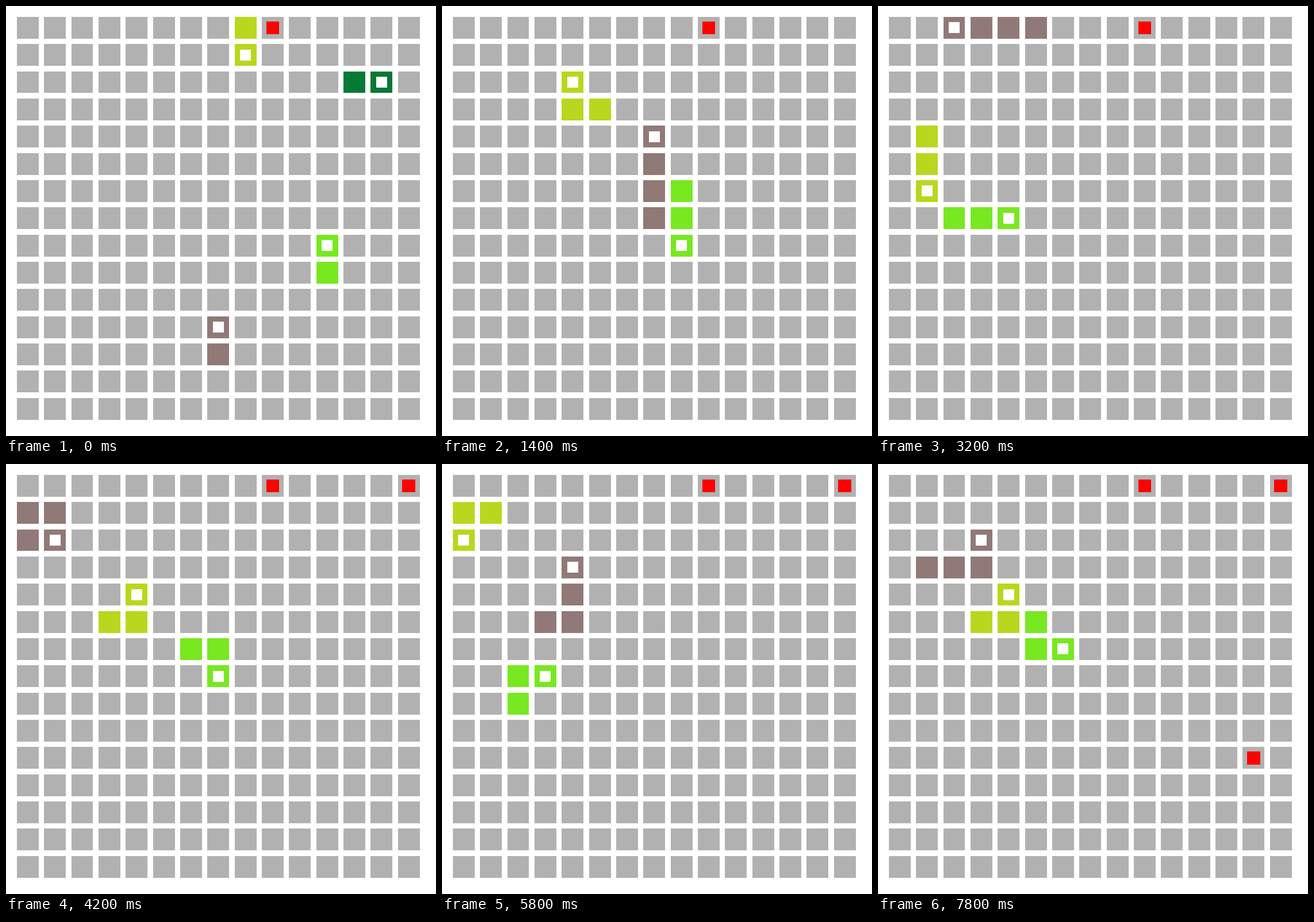
These frames come from a looping animation (748x748 px, 8000 ms). An HTML page with a canvas:

```html
<!DOCTYPE html>
<html lang="en">
<head>
<meta charset="utf-8">
<title>Snakes</title>
<style>
  html, body { margin: 0; width: 100%; height: 100%; overflow: hidden; background: #fff; }
  canvas { display: block; }
</style>
</head>
<body>
<canvas id="board" width="748" height="748"></canvas>
<script>
const ctx = document.getElementById('board').getContext('2d');
const CELLS = 15, STEP_MS = 200, STEPS = 40;
const UNIT = 748 / 79;
const MOVES = { U: [0, -1], D: [0, 1], L: [-1, 0], R: [1, 0] };

// Each route begins at the tail cell; its first move leads to the opening pose.
const snakes = [
  { color: '#b9d71e', length: 3, start: [8, 0],
    route: 'D DLLDLLU LLLLDDRDD RURRU UULULLLD DDRDDR RURU' },
  { color: '#067935', length: 3, start: [12, 2], route: 'R UU' },
  { color: '#78e820', length: 3, start: [11, 9],
    route: 'U UULLLDD LLLLLLURR RURRD LDLLLLUR URUURR DLDR' },
  { color: '#917977', length: 4, start: [7, 12],
    route: 'U UUUUUUU ULLUUULLL LDLDR RDDDRRUU ULLLLD RRRU' }
];
for (const snake of snakes) {
  snake.trail = [snake.start];
  for (const move of snake.route.replaceAll(' ', '')) {
    const [x, y] = snake.trail.at(-1), [dx, dy] = MOVES[move];
    snake.trail.push([x + dx, y + dy]);
  }
}

const foods = [
  { cell: [9, 0], from: 0 },
  { cell: [14, 0], from: 17 },
  { cell: [13, 10], from: 33 }
];

// Fills a cell, inset by a number of units, on whole pixels.
function fillCell([x, y], color, inset = 0) {
  const near = i => Math.round((2 + 5 * i + inset) * UNIT);
  const far = i => Math.round((6 + 5 * i - inset) * UNIT);
  ctx.fillStyle = color;
  ctx.fillRect(near(x), near(y), far(x) - near(x), far(y) - near(y));
}

function drawSnake({ trail, length, color }, step) {
  const head = step + 1;
  if (head >= trail.length) return;
  trail.slice(Math.max(0, head - length + 1), head + 1)
    .forEach(cell => fillCell(cell, color));
  fillCell(trail[head], '#fff', 1);
}

function draw(step) {
  ctx.fillStyle = '#fff';
  ctx.fillRect(0, 0, 748, 748);
  for (let y = 0; y < CELLS; y++)
    for (let x = 0; x < CELLS; x++) fillCell([x, y], '#b1b1b1');
  for (const { cell, from } of foods)
    if (step >= from) fillCell(cell, '#f00', 0.8);
  for (const snake of snakes) drawSnake(snake, step);
}

const startTime = performance.now();
function tick() {
  const elapsed = performance.now() - startTime;
  draw(Math.floor(elapsed / STEP_MS) % STEPS);
  requestAnimationFrame(tick);
}
tick();
</script>
</body>
</html>
```
